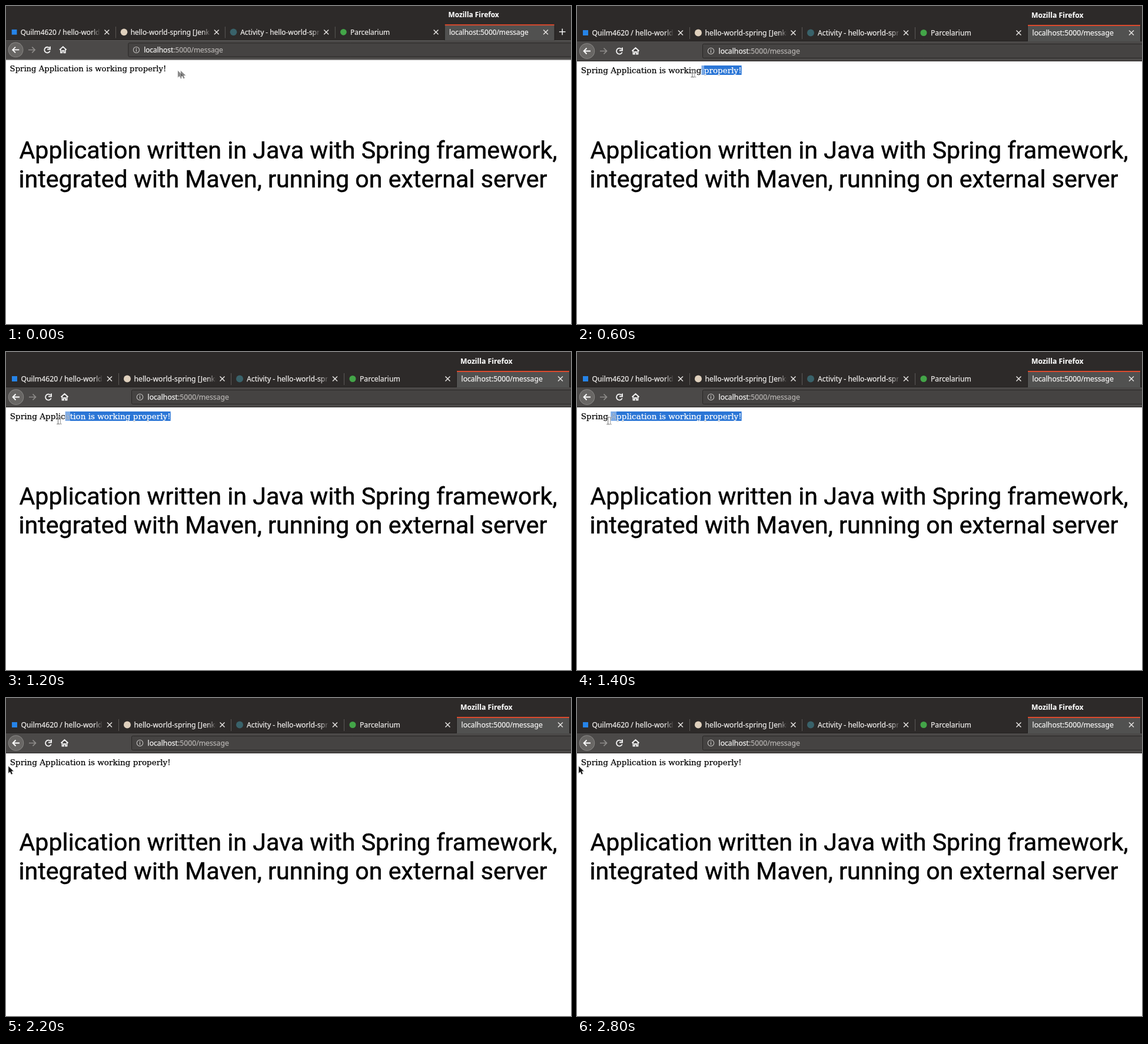
Write an HTML page with a canvas that moves like this. It is 960 px wide and 540 px high and loops after 3 s.

```html
<!DOCTYPE html>
<html lang="en">
<head>
<meta charset="utf-8">
<title>Spring application demo</title>
<style>
  html, body { margin: 0; width: 100%; height: 100%; overflow: hidden; background: #fff; }
  canvas { display: block; }
</style>
</head>
<body>
<canvas id="stage" width="960" height="540"></canvas>
<script>
const ctx = document.getElementById('stage').getContext('2d');

const LOOP = 3000, STEP = 200;
const INTRO_SCALE = 0.9735;
const UI = '12.2px "Noto Sans", sans-serif';
const UI_BOLD = 'bold 12.2px "Noto Sans", sans-serif';
const SERIF = '13.55px "DejaVu Serif", serif';
const CAPTION = '41.2px Roboto, sans-serif';
const MESSAGE = 'Spring Application is working properly!';
const MESSAGE_X = 6.8, MESSAGE_Y = 114;

function rect(x, y, w, h, color) {
  ctx.fillStyle = color;
  ctx.fillRect(x, y, w, h);
}

// A hairline outline gives the type a slightly heavier weight.
function text(str, x, y, font, color, outline = 0.25) {
  ctx.font = font;
  ctx.fillStyle = ctx.strokeStyle = color;
  ctx.lineWidth = outline;
  ctx.fillText(str, x, y);
  ctx.strokeText(str, x, y);
}

function circle(x, y, r, color) {
  ctx.fillStyle = color;
  ctx.beginPath();
  ctx.arc(x, y, r, 0, Math.PI * 2);
  ctx.fill();
}

// Strokes an SVG path whose own origin is placed at x, y.
function stroke(path, x, y, color, width = 1.6) {
  ctx.save();
  ctx.translate(x, y);
  ctx.strokeStyle = color;
  ctx.lineWidth = width;
  ctx.stroke(new Path2D(path));
  ctx.restore();
}

function closeMark(x) {
  stroke('M-4-4 4 4M4-4-4 4', x, 45.5, '#e6e4e2', 1.5);
}

function tab(label, x, end) {
  const fade = ctx.createLinearGradient(end - 16, 0, end, 0);
  fade.addColorStop(0, '#ebe9e7');
  fade.addColorStop(1, 'rgba(235,233,231,0)');
  text(label, x, 50, UI, fade);
}

function drawTabs() {
  rect(0, 0, 1000, 60, '#2d2a29');
  text('Mozilla Firefox', 772, 20, UI_BOLD, '#fff', 0.1);

  rect(10, 41, 9, 9, '#2684e8');
  circle(206, 45.5, 6, '#dfd0bd');
  circle(397, 45.5, 6, '#39626a');
  circle(589, 45.5, 5.5, '#43a548');

  tab('Quilm4620 / hello-world-spring', 25.5, 164);
  tab('hello-world-spring [Jenkins]', 217.5, 357);
  tab('Activity - hello-world-spring', 409, 548);
  tab('Parcelarium', 601, 740);
  for (const x of [191, 382, 574]) rect(x, 36, 1, 20, '#5c5957');

  rect(765, 32, 193, 28, '#1f1d1c');
  rect(766, 33, 191, 28, '#515150');
  rect(766, 32, 191, 2, '#dc4a2d');
  text('localhost:5000/message', 773.5, 50, UI, '#f2f1f0');
  for (const x of [176, 367.5, 559, 750.5, 942]) closeMark(x);
  stroke('M-5.5 0H5.5M0-5.5V5.5', 971, 45, '#eee', 1.6);
}

function drawToolbar() {
  rect(0, 59, 766, 1, '#242221');
  rect(957, 59, 43, 1, '#242221');
  rect(0, 60, 1000, 33, '#4b4948');
  rect(0, 93, 1000, 1, '#2a2827');

  circle(17, 76.5, 13.2, '#8b8987');
  circle(17, 76.5, 12.3, '#686664');
  stroke('M6 0H-5.5M-.5-5-5.5 0-.5 5', 17, 76.5, '#fff', 1.8);
  stroke('M-6 0H5.5M.5-5 5.5 0 .5 5', 45, 76.5, '#8e8c8a', 1.7);
  stroke('M3.7-3.3A5 5 0 1 0 4.7 2M5-6V-1H0', 72, 76.5, '#f4f4f4', 1.9);
  stroke('M-6 0 0-5.5 6 0M-4-1V5H-1.5V1.5H1.5V5H4V-1', 99.5, 76.5, '#f4f4f4', 1.8);

  ctx.beginPath();
  ctx.roundRect(213.5, 64.5, 800, 24, 2);
  ctx.fillStyle = '#454342';
  ctx.fill();
  ctx.strokeStyle = '#292726';
  ctx.lineWidth = 1;
  ctx.stroke();

  stroke('M-5.2 0a5.2 5.2 0 1 0 10.4 0a5.2 5.2 0 1 0-10.4 0', 227.5, 76.5, '#c4c2c0', 1.1);
  stroke('M0-1V3M0-3.2V-1.8', 227.5, 76.5, '#c4c2c0', 1.3);
  text('localhost', 240.5, 81, UI, '#f2f1f0');
  text(':5000/message', 240.5 + ctx.measureText('localhost').width, 81, UI, '#b3b0ae');
}

function charX(index) {
  ctx.font = SERIF;
  return MESSAGE_X + ctx.measureText(MESSAGE.slice(0, index)).width;
}

function highlight(from, to, alpha) {
  const left = charX(from);
  ctx.save();
  ctx.globalAlpha = alpha;
  ctx.beginPath();
  ctx.rect(left, 101, charX(to) - left, 16);
  ctx.clip();
  rect(0, 101, 300, 16, '#2b76d6');
  text(MESSAGE, MESSAGE_X, MESSAGE_Y, SERIF, '#fff');
  ctx.restore();
}

function drawSelection(step) {
  const end = MESSAGE.length;
  if (step === 9) return highlight(0, end, 0.62);
  if (step === 8) return highlight(0, end, 1);
  if (step < 2 || step > 9) return;
  const pointer = 287 - 38.7 * (step - 1);
  let first = 0;
  while (first < end && charX(first) < pointer) first++;
  if (first === end) return;
  highlight(first, first + 1, 0.6);
  highlight(first + 1, end, 1);
}

function arrow(x, y, alpha) {
  ctx.save();
  ctx.globalAlpha = alpha;
  ctx.translate(x, y);
  const shape = new Path2D('M0 0V11.5L2.7 9 4.8 13.6 6.8 12.7 4.8 8.3H8.4Z');
  ctx.strokeStyle = '#e4e4e4';
  ctx.lineWidth = 1.6;
  ctx.stroke(shape);
  ctx.fillStyle = '#151515';
  ctx.fill(shape);
  ctx.restore();
}

function beam(x, y, alpha) {
  ctx.save();
  ctx.globalAlpha = alpha;
  const shape = 'M-2.5-6H-.7L0-5.3.7-6H2.5M0-5.3V5.3M-2.5 6H-.7L0 5.3.7 6H2.5';
  stroke(shape, x, y, '#fff', 2.4);
  stroke(shape, x, y, '#333', 1.1);
  ctx.restore();
}

function drawPointer(step) {
  if (step === 0) {
    arrow(300, 113, 0.5);
    arrow(305, 113, 0.5);
  } else if (step < 9) {
    const moved = step - 1;
    const x = 267.5 - 35.8 * moved, y = 113.5 + 0.55 * moved;
    beam(x + 4, y, 0.45);
    beam(x, y, 0.65);
  } else {
    arrow(5 - 0.4 * (step - 9), 116, 1);
  }
}

function draw(time) {
  const step = Math.floor((time % LOOP) / STEP);
  const scale = step === 0 ? INTRO_SCALE : 1;

  ctx.setTransform(1, 0, 0, 1, 0, 0);
  rect(0, 0, 960, 540, '#fff');

  ctx.setTransform(scale, 0, 0, scale, 0, 0);
  drawTabs();
  drawToolbar();
  text(MESSAGE, MESSAGE_X, MESSAGE_Y, SERIF, '#000');
  drawSelection(step);
  drawPointer(step);

  ctx.setTransform(1, 0, 0, 1, 0, 0);
  text('Application written in Java with Spring framework,', 22.5, 259, CAPTION, '#000', 0.5);
  text('integrated with Maven, running on external server', 21.5, 308, CAPTION, '#000', 0.5);
}

const start = performance.now();
function tick() {
  draw(performance.now() - start);
  requestAnimationFrame(tick);
}
tick();
</script>
</body>
</html>
```
